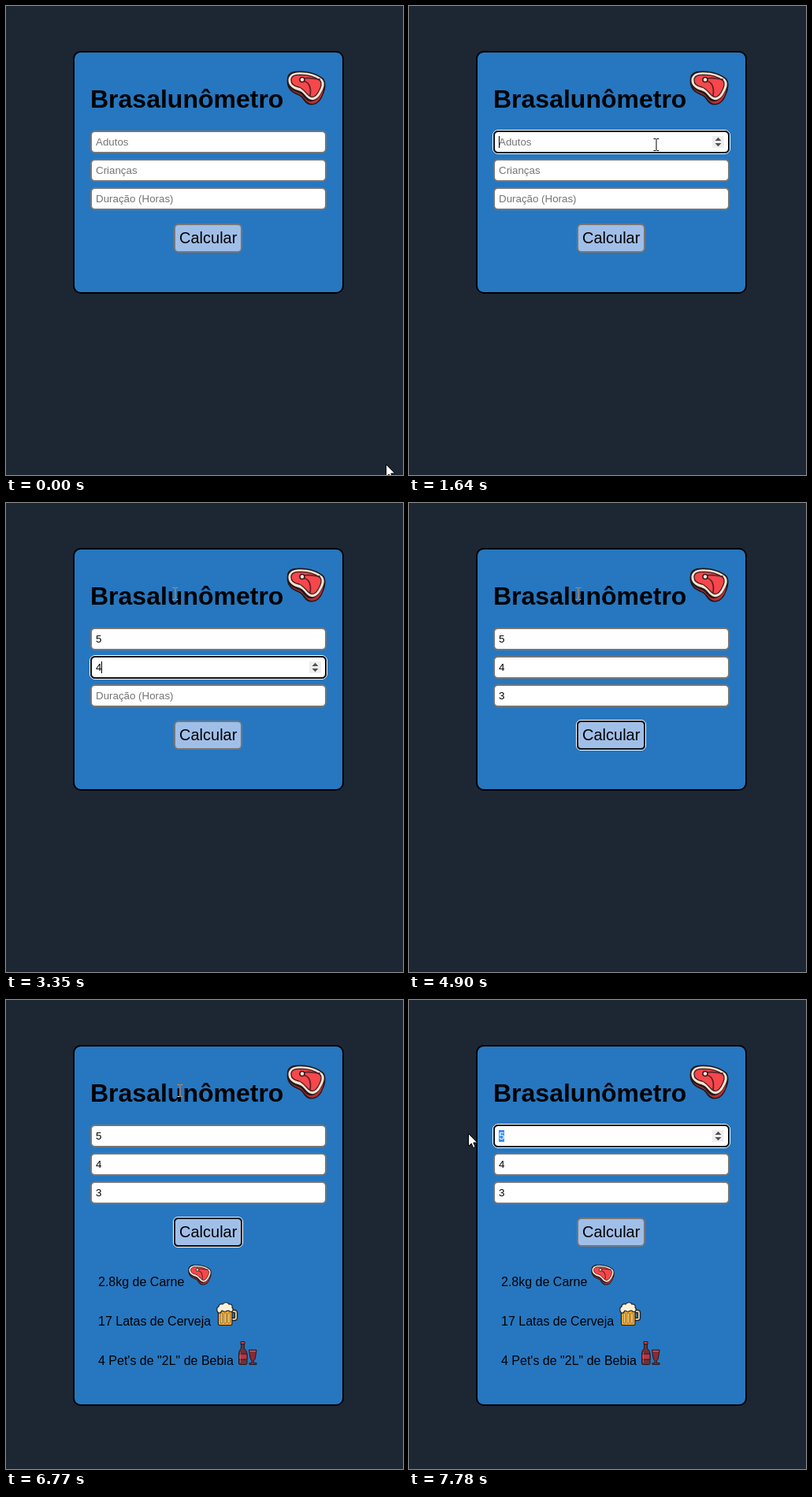
An HTML page for the animation above (8 s loop, 504 by 595 pixels).

```html
<!DOCTYPE html>
<html lang="pt-BR">
<head>
<meta charset="utf-8">
<title>Brasalunômetro</title>
<style>
html, body { margin: 0; width: 100%; height: 100%; overflow: hidden; background: #1c2733; }
svg { display: block; width: 504px; height: 595px; font: 13.333px "Liberation Sans", Arial, sans-serif; isolation: isolate; }
.title { font-size: 32px; font-weight: bold; }
.button { font-size: 20px; }
.results { font-size: 16px; }
.hint { fill: #757575; }
.crisp { shape-rendering: crispEdges; }
.beam { mix-blend-mode: difference; }

/* 1% = 80 ms */
[class*="t-"], .card, .results, .arrow, .beam { animation: 8s step-end infinite; }
.card { height: 306px; animation-name: grow; }
.results { animation-name: results; }
.arrow { animation-name: arrow; }
.beam { animation-name: beam; }
.t-hint1 { animation-name: hint1; }
.t-hint2 { animation-name: hint2; }
.t-hint3 { animation-name: hint3; }
.t-value1 { animation-name: value1; }
.t-value2 { animation-name: value2; }
.t-value3 { animation-name: value3; }
.t-focus1 { animation-name: focus1; }
.t-focus2 { animation-name: focus2; }
.t-focus3 { animation-name: focus3; }
.t-focus4 { animation-name: focus4; }
.t-spin1 { animation-name: spin1; }
.t-spin2 { animation-name: spin2; }
.t-caret1 { animation-name: caret1; }
.t-caret2 { animation-name: caret2; }
.t-caret3 { animation-name: caret3; }
.t-select { animation-name: selected; }

@keyframes grow { 0% { height: 306px } 64.125%, 100% { height: 456px } }
@keyframes results { 0% { visibility: hidden } 64.125%, 100% { visibility: visible } }

@keyframes hint1 { 0% { visibility: visible } 32.125%, 100% { visibility: hidden } }
@keyframes hint2 { 0% { visibility: visible } 41.875%, 100% { visibility: hidden } }
@keyframes hint3 { 0% { visibility: visible } 51.5%, 100% { visibility: hidden } }
@keyframes value1 { 0% { visibility: hidden } 32.125%, 100% { visibility: visible } }
@keyframes value2 { 0% { visibility: hidden } 41.875%, 100% { visibility: visible } }
@keyframes value3 { 0% { visibility: hidden } 51.5%, 100% { visibility: visible } }

@keyframes focus1 { 0%, 37% { visibility: hidden } 19.625%, 89.5%, 100% { visibility: visible } }
@keyframes focus2 { 0%, 47.625%, 100% { visibility: hidden } 37% { visibility: visible } }
@keyframes focus3 { 0%, 56.5%, 100% { visibility: hidden } 47.625% { visibility: visible } }
@keyframes focus4 { 0%, 89.5%, 100% { visibility: hidden } 56.5% { visibility: visible } }
@keyframes spin1 { 0%, 37% { visibility: hidden } 14.625%, 86.5%, 100% { visibility: visible } }
@keyframes spin2 { 0%, 14.625%, 47.625%, 100% { visibility: hidden } 12.625%, 37% { visibility: visible } }

@keyframes caret1 {
  0%, 26.375%, 37%, 92.375%, 100% { visibility: hidden }
  19.625%, 32.125%, 89.5% { visibility: visible }
  0% { transform: none }
  32.125%, 100% { transform: translateX(7px) }
}
@keyframes caret2 {
  0%, 47.625%, 100% { visibility: hidden }
  37% { visibility: visible }
  0% { transform: none }
  41.875%, 100% { transform: translateX(7px) }
}
@keyframes caret3 {
  0%, 56.5%, 100% { visibility: hidden }
  47.625% { visibility: visible }
  0% { transform: none }
  51.5%, 100% { transform: translateX(7px) }
}
@keyframes selected { 0% { visibility: hidden } 92.375%, 100% { visibility: visible } }

@keyframes arrow {
  0% { visibility: visible; transform: translate(482px, 581px) }
  1% { transform: translate(482px, 579px) }
  8.75% { transform: translate(474px, 548px) }
  9.75% { transform: translate(455px, 465px) }
  10.75% { transform: translate(437px, 365px) }
  11.75% { transform: translate(420px, 275px) }
  12.625% { visibility: hidden }
  97.25%, 100% { visibility: visible; transform: translate(75px, 169px) }
}
@keyframes beam {
  0% { visibility: hidden; transform: translate(406.5px, 208px) }
  12.625% { visibility: visible }
  13.625% { transform: translate(384.5px, 196px) }
  14.625% { transform: translate(352.5px, 184px) }
  15.625% { transform: translate(326.5px, 177px) }
  16.75% { transform: translate(313.5px, 176px) }
  24.5% { transform: translate(285.5px, 160px) }
  25.5% { transform: translate(232.5px, 124px) }
  26.375% { transform: translate(214.5px, 115px) }
  84.625% { transform: translate(220.5px, 115px) }
  85.5% { transform: translate(213.5px, 140px) }
  86.5% { transform: translate(196.5px, 169px) }
  87.5% { transform: translate(185.5px, 177px) }
  90.5% { transform: translate(165.5px, 173px) }
  91.5% { transform: translate(132.5px, 168px) }
  92.375% { transform: translate(98.5px, 164px) }
  93.375% { transform: translate(72.5px, 162px) }
  94.375% { transform: translate(66.5px, 162px) }
  95.375% { transform: translate(66.5px, 164px) }
  96.375% { transform: translate(70.5px, 168px) }
  97.25%, 100% { visibility: hidden }
}
</style>
</head>
<body>
<svg viewBox="0 0 504 595">
  <defs>
    <rect id="field" x="108" y="1" width="298" height="27" rx="5" fill="#fff" stroke="#767676" stroke-width="2"/>
    <g id="ring" fill="none">
      <rect x="106.5" y="-.5" width="301" height="30" rx="6.5" stroke="#fff"/>
      <rect x="108" y="1" width="298" height="27" rx="5" stroke="#101010" stroke-width="2"/>
    </g>
    <g id="spinner">
      <rect x="385" y="7" width="15" height="15" fill="#efefef"/>
      <path d="M388.5 13L392.5 8.8 396.5 13zM388.5 16L392.5 20.2 396.5 16z" fill="#505050"/>
    </g>
    <rect id="caret" class="crisp" x="114" y="7" width="1" height="15"/>

    <symbol id="meat" viewBox="0 0 50 50">
      <path d="M1 14C1 7 8 4 17 4.500C28 4 40 8 47 14C51 19 50 28 46 36C43 44 37 48 31 47.500C25 47 23 43 20 39C16 34 8 34 4 28C1 24 0 19 1 14Z" fill="#20181c"/>
      <path d="M2.500 17C2 10 8 6 17 6.200C28 6 39 9 45.500 15C50 20 47 27 44 32C40 40 34 43 29 40C23 36 22 31 15 29C8 27 3 23 2.500 17Z" fill="#f4e3cf"/>
      <path d="M4 25C8 31 16 31 20 35C24 40 27 44 33 43C40 41 44 34 47 27C46 37 40 46 33 46C25 46 24 39 18 35C13 32 7 31 4 25Z" fill="#b92f35"/>
      <path d="M6 16C6 11 11 9 18 9.500C27 9 37 12 43 17C46 21 43 27 40 32C37 37 33 39 29 36C24 32 22 27 16 25C10 24 6 21 6 16Z" fill="#f6474c" stroke="#35191d" stroke-width="1.300"/>
      <path d="M20 15C27 11 33 15 43 15M21 17C28 18 32 24 30 36" fill="none" stroke="#571f26" stroke-width="1.700"/>
      <circle cx="20" cy="15.500" r="3" fill="#f7e8d5" stroke="#35191d" stroke-width="1.500"/>
    </symbol>

    <symbol id="beer" viewBox="0 0 30 30">
      <path d="M21 12H25Q27 12 27 14V20Q27 22 25 22H21" fill="none" stroke="#1b222d" stroke-width="4.500"/>
      <path d="M21 12H25Q27 12 27 14V20Q27 22 25 22H21" fill="none" stroke="#e8c68d" stroke-width="2"/>
      <path d="M4.500 9H22V28Q22 29.500 20 29.500H6.500Q4.500 29.500 4.500 28Z" fill="#f8ad2d" stroke="#1b222d" stroke-width="1.200"/>
      <path d="M8.500 15V26M13.200 15V26M18 15V26" fill="none" stroke="#74502a" stroke-width="3.200" stroke-linecap="round"/>
      <path d="M8.500 15V26M13.200 15V26M18 15V26" fill="none" stroke="#ffdb87" stroke-width="1.700" stroke-linecap="round"/>
      <path d="M5 14C2 12 2 7 5 6C5 3 8 2 10 3C12 0 17 0 18 3C21 2 23 5 22 7C25 10 22 14 19 12C17 10 15 12 14 12C11 13 10 11 9 11C8 13 7 15 5 14Z" fill="#fff1d7" stroke="#1b222d" stroke-width="1.200"/>
    </symbol>

    <symbol id="drink" viewBox="0 0 30 30">
      <g stroke="#26191d">
        <path d="M5.500 3H9.500V9Q13 12 13 16V28Q13 29.500 11.500 29.500H4Q2.500 29.500 2.500 28V16Q2.500 12 5.500 9Z" fill="#703038"/>
        <path d="M5 .5H10V3.500H5Z" fill="#d93b45"/>
        <path d="M2.500 16H13V23H2.500Z" fill="#bd3641"/>
        <path d="M15.500 11H25L23.500 21Q23 24 21.500 24V27.500H25V29.500H16V27.500H19V24Q17.500 24 17 21Z" fill="#8d2932"/>
      </g>
      <path d="M16.500 12.500H24" stroke="#d26a6b"/>
      <path d="M4.500 14V27" stroke="#bb6063" stroke-width=".8"/>
    </symbol>
  </defs>

  <rect width="504" height="595" fill="#1c2733"/>
  <rect class="card" x="86" y="58" width="342" rx="9" fill="#2677c0" stroke="#000" stroke-width="2"/>
  <text class="title" x="107" y="129">Brasalunômetro</text>
  <use href="#meat" x="356" y="78" width="50" height="50"/>

  <g transform="translate(0 158)">
    <use href="#field"/>
    <use href="#ring" class="t-focus1"/>
    <use href="#spinner" class="t-spin1"/>
    <text class="hint t-hint1" x="114" y="19">Adutos</text>
    <text class="t-value1" x="114" y="19">5</text>
    <g class="t-select">
      <rect class="crisp" x="114" y="7" width="7" height="15" fill="#3390ff"/>
      <text x="114" y="19" fill="#fff">5</text>
    </g>
    <use href="#caret" class="t-caret1"/>
  </g>
  <g transform="translate(0 194)">
    <use href="#field"/>
    <use href="#ring" class="t-focus2"/>
    <use href="#spinner" class="t-spin2"/>
    <text class="hint t-hint2" x="114" y="19">Crianças</text>
    <text class="t-value2" x="114" y="19">4</text>
    <use href="#caret" class="t-caret2"/>
  </g>
  <g transform="translate(0 230)">
    <use href="#field"/>
    <use href="#ring" class="t-focus3"/>
    <use href="#spinner" class="t-focus3"/>
    <text class="hint t-hint3" x="114" y="19">Duração (Horas)</text>
    <text class="t-value3" x="114" y="19">3</text>
    <use href="#caret" class="t-caret3"/>
  </g>

  <rect x="214" y="277" width="85" height="35" rx="5" fill="#a0bfe8" stroke="#767676" stroke-width="2"/>
  <g class="t-focus4" fill="none">
    <rect x="212.500" y="275.500" width="88" height="38" rx="5.500" stroke="#fff"/>
    <rect x="214" y="277" width="85" height="35" rx="4.500" stroke="#101010" stroke-width="2"/>
  </g>
  <text class="button" x="220" y="301">Calcular</text>

  <g class="results">
    <text x="117" y="363">2.8kg de Carne</text>
    <use href="#meat" x="231" y="333" width="30" height="30"/>
    <text x="117" y="413">17 Latas de Cerveja</text>
    <use href="#beer" x="265" y="383" width="30" height="30"/>
    <text x="117" y="463">4 Pet's de "2L" de Bebia</text>
    <use href="#drink" x="293" y="433" width="30" height="30"/>
  </g>

  <path class="beam crisp" d="M-3.500-8h3v1h1v-1h3v1h-3v14h3v1h-3v-1h-1v1h-3v-1h3v-14h-3z" fill="#fff"/>
  <path class="arrow" d="M.5.5V16.500L4.200 13 6.700 18.500 9.200 17.400 6.800 12H11.800Z" fill="#fff" stroke="#000"/>
</svg>
</body>
</html>
```
